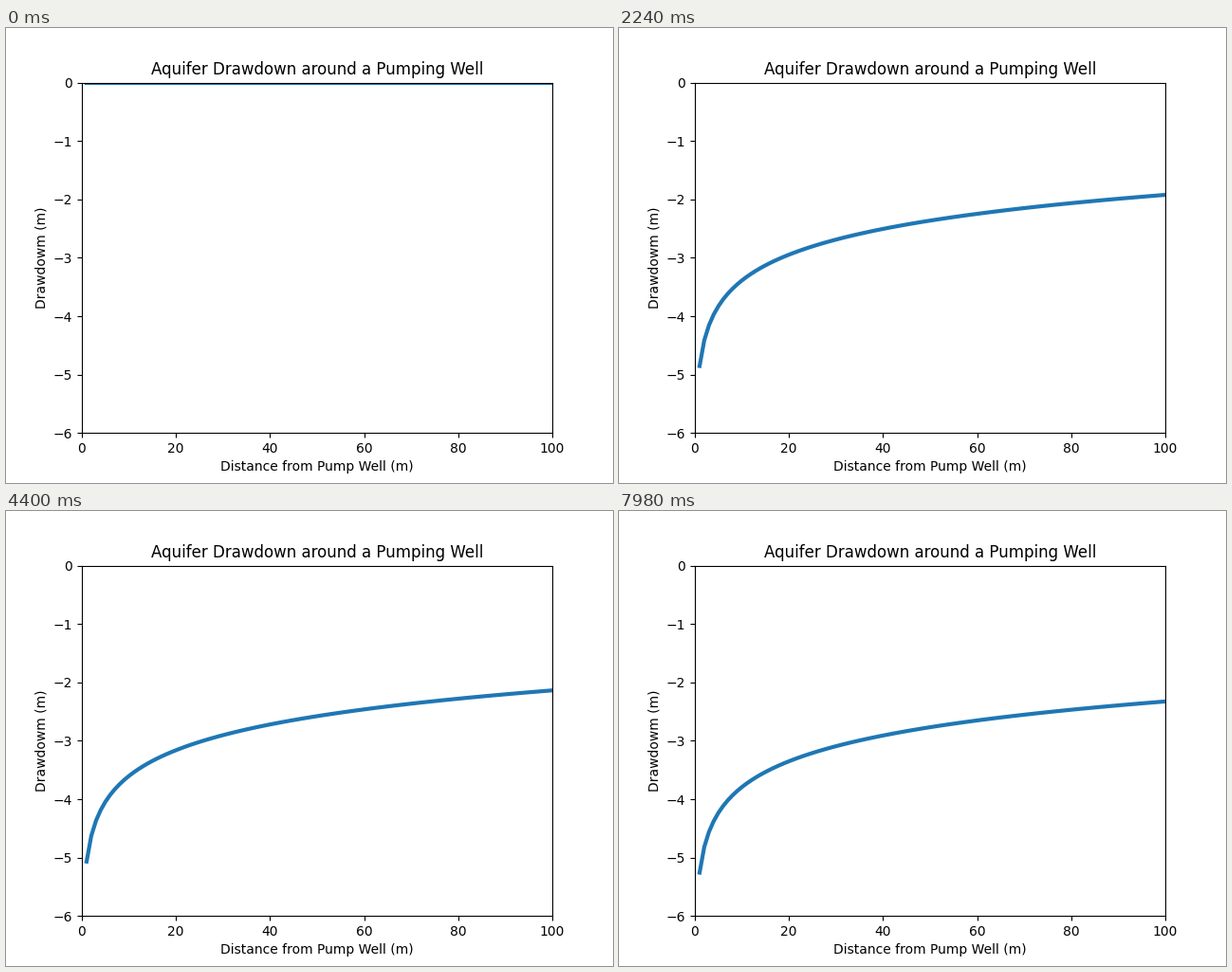
Animation, 640 px wide and 480 px high, one loop 8 s. Source, as a matplotlib script:

```python
import math

import matplotlib.pyplot as plt
import numpy as np
from matplotlib.animation import FuncAnimation

FRAMES = 400
INTERVAL = 20  # ms
SCALE = 1 / math.pi  # Q / (4 pi T)
RATIO = 1.5e-5  # S / (4 T)
EULER = 0.5772156649

plt.rcParams["font.family"] = "DejaVu Sans"


def well_function(u):
    """Theis well function W(u) by its series, for small u."""
    total = -EULER - np.log(u)
    for k in range(1, 12):
        total -= (-u) ** k / (k * math.factorial(k))
    return total


def drawdown(r, t):
    if t == 0:
        return np.zeros_like(r)
    return -SCALE * well_function(RATIO * r**2 / t)


radius = np.arange(1.0, 101.0)

fig, ax = plt.subplots(figsize=(6.4, 4.8), dpi=100)
ax.set_xlim(0, 100)
ax.set_ylim(-6, 0)
ax.set_title("Aquifer Drawdown around a Pumping Well")
ax.set_xlabel("Distance from Pump Well (m)")
ax.set_ylabel("Drawdowm (m)")
(curve,) = ax.plot(radius, drawdown(radius, 0), color="#1f77b4", lw=3)


def update(step):
    curve.set_ydata(drawdown(radius, step))
    return (curve,)


def init():
    return update(0)


anim = FuncAnimation(fig, update, frames=FRAMES, init_func=init,
                     interval=INTERVAL, repeat=True, repeat_delay=0)
plt.show()
```
